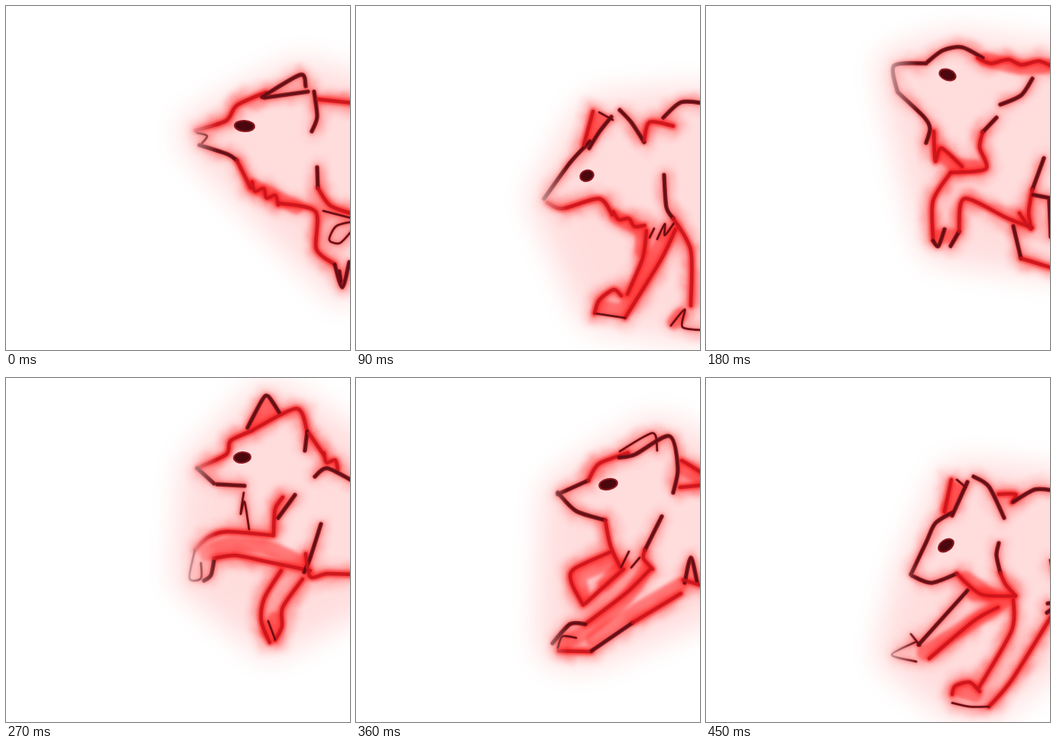
Write an HTML page that moves like this. It is 450 by 450 pixels and loops after 540 ms.

```html
<!DOCTYPE html>
<html lang="en">
<head>
<meta charset="utf-8">
<title>Running wolf</title>
<style>
html, body { margin: 0; height: 100%; overflow: hidden; background: #fff; }
svg { display: block; width: 100vw; height: 100vh; }
path { fill: none; stroke-linecap: round; stroke-linejoin: round; }
</style>
</head>
<body>
<svg id="stage" viewBox="0 0 450 450">
  <defs>
    <filter id="haze" filterUnits="userSpaceOnUse" x="-50" y="-50" width="640" height="560" color-interpolation-filters="sRGB">
      <feGaussianBlur stdDeviation="19"/>
    </filter>
    <filter id="glow" filterUnits="userSpaceOnUse" x="0" y="-50" width="520" height="560" color-interpolation-filters="sRGB">
      <feTurbulence type="fractalNoise" baseFrequency=".035" numOctaves="2" seed="4" result="noise"/>
      <feGaussianBlur in="SourceGraphic" stdDeviation="7.5" result="soft"/>
      <feDisplacementMap in="soft" in2="noise" scale="14" xChannelSelector="R" yChannelSelector="G"/>
    </filter>
    <filter id="smear" filterUnits="userSpaceOnUse" x="0" y="-50" width="520" height="560" color-interpolation-filters="sRGB">
      <feGaussianBlur stdDeviation="2.2"/>
    </filter>
    <linearGradient id="edge" gradientUnits="userSpaceOnUse" x1="234" y1="0" x2="276" y2="0">
      <stop stop-color="#fff" stop-opacity=".25"/>
      <stop offset="1" stop-color="#fff"/>
    </linearGradient>
    <mask id="fade" maskUnits="userSpaceOnUse" x="0" y="0" width="450" height="450">
      <rect width="450" height="450" fill="url(#edge)"/>
    </mask>
  </defs>
</svg>
<script>
const stage = document.getElementById('stage');

function add(parent, name, attrs) {
  const el = document.createElementNS('http://www.w3.org/2000/svg', name);
  for (const key in attrs) el.setAttribute(key, attrs[key]);
  return parent.appendChild(el);
}

const pairs = nums => nums.flatMap((x, i) => i % 2 ? [] : [[x, nums[i + 1]]]);

// Smooth curve through all points
function curve(pts) {
  const at = i => pts[Math.max(0, Math.min(pts.length - 1, i))];
  let d = 'M' + pts[0];
  for (let i = 0; i < pts.length - 1; i++) {
    const [a, b, c, e] = [at(i - 1), at(i), at(i + 1), at(i + 2)];
    const p = [0, 1].map(k => b[k] + (c[k] - a[k]) / 7);
    const q = [0, 1].map(k => c[k] - (e[k] - b[k]) / 7);
    d += `C${p} ${q} ${c}`;
  }
  return d;
}

function hull(pts) {
  const half = list => {
    const out = [];
    for (const p of list) {
      while (out.length > 1) {
        const [a, b] = out.slice(-2);
        if ((b[0] - a[0]) * (p[1] - a[1]) > (b[1] - a[1]) * (p[0] - a[0])) break;
        out.pop();
      }
      out.push(p);
    }
    return out;
  };
  const sorted = [...pts].sort((a, b) => a[0] - b[0] || a[1] - b[1]);
  return [...half(sorted), ...half(sorted.reverse())];
}

function build(pose) {
  const root = add(stage, 'g', { display: 'none' });
  const haze = add(root, 'g', { filter: 'url(#haze)', opacity: .13 });
  const front = add(root, 'g', { mask: 'url(#fade)' });
  const glow = add(front, 'g', { filter: 'url(#glow)', opacity: .6 });
  const smear = add(front, 'g', { filter: 'url(#smear)' });
  const lines = add(front, 'g', {});
  const all = [];
  const stroke = (layer, d, color, width, opacity = 1) =>
    add(layer, 'path', { d, stroke: color, 'stroke-width': width, 'stroke-opacity': opacity });

  const trace = (nums, halo, width, color, core) => {
    const pts = pairs(nums), d = curve(pts);
    all.push(...pts);
    stroke(glow, d, '#ff1616', halo);
    stroke(smear, d, '#fa1c1c', width + halo / 5, core ? .45 : .9);
    stroke(lines, d, color, width, .88);
    if (core) stroke(lines, d, core, width / 2, .7);
  };
  const red = (...n) => trace(n, 17, 4.5, '#c9141c');
  const ink = (...n) => trace(n, 9, 5.5, '#7d1018', '#4d0a10');
  const thin = (...n) => trace(n, 7, 3, '#7d1018', '#4d0a10');
  const wash = (...n) => stroke(smear, curve(pairs(n)), '#ff2525', 19, .5);
  const fur = (x, y, x2, y2, count, size) => {
    const nums = [];
    for (let i = 0; i <= count; i++) {
      const t = i / count, side = i % 2 ? size : -size;
      nums.push(x + (x2 - x) * t - side / 2, y + (y2 - y) * t + side);
    }
    red(...nums);
  };
  const eye = (x, y, tilt, rx = 11) => add(lines, 'ellipse', {
    rx, ry: 7, fill: '#4a080e', stroke: '#8f1820', 'stroke-width': 2,
    transform: `translate(${x} ${y}) rotate(${tilt})`
  });

  pose({ red, ink, thin, wash, fur, eye });
  const body = hull(all.map(([x, y]) => [x > 440 ? x + 70 : x, y]));
  add(haze, 'path', { d: `M${body.join('L')}Z`, stroke: '#f00', 'stroke-width': 42, style: 'fill:#f00' });
  return root;
}

function stretch({ red, ink, thin, wash, fur, eye }) {
  wash(322, 235, 380, 263);
  red(248, 163, 288, 150, 302, 130, 340, 113);
  ink(335, 119, 385, 90, 392, 105);
  ink(338, 120, 395, 112);
  ink(403, 112, 407, 145, 400, 164);
  red(408, 122, 454, 127);
  eye(312, 157, 4, 13);
  thin(250, 166, 263, 170, 256, 180);
  ink(253, 182, 290, 194, 302, 202);
  red(302, 202, 320, 238);
  fur(320, 234, 358, 256, 5, 4);
  red(358, 258, 405, 269, 406, 318, 430, 338);
  ink(407, 211, 408, 238);
  red(408, 238, 424, 261, 454, 272);
  ink(430, 338, 440, 368, 449, 335);
  ink(436, 347, 438, 360);
  thin(415, 268, 454, 278);
  thin(454, 282, 432, 288, 423, 306, 437, 310, 454, 292);
}

function land({ red, ink, thin, wash, fur, eye }) {
  wash(320, 148, 307, 172);
  wash(408, 300, 385, 335, 352, 394, 322, 394);
  wash(340, 276, 372, 294, 374, 320);
  wash(416, 414, 424, 404);
  ink(246, 252, 280, 205, 306, 177);
  red(298, 182, 310, 138);
  ink(305, 186, 318, 165, 334, 145);
  thin(318, 139, 336, 149);
  ink(345, 136, 360, 152, 377, 178);
  red(377, 176, 384, 152, 415, 157);
  ink(402, 146, 425, 126, 454, 127);
  eye(302, 222, -20, 9);
  red(250, 257, 270, 265, 318, 252, 335, 273);
  fur(335, 272, 376, 290, 4, 3);
  red(380, 294, 375, 330, 355, 377);
  red(418, 292, 400, 330, 365, 387, 352, 408);
  thin(352, 408, 312, 402);
  red(312, 402, 318, 385, 337, 371, 347, 379);
  ink(403, 221, 406, 263, 415, 278);
  thin(390, 291, 384, 303);
  thin(394, 305, 404, 285, 404, 300, 416, 284);
  red(415, 278, 438, 320, 438, 392);
  thin(412, 418, 430, 397, 427, 420, 454, 424);
}

function rise({ red, ink, thin, wash, fur, eye }) {
  wash(365, 70, 412, 80, 454, 78);
  wash(304, 190, 325, 207, 352, 211);
  wash(304, 302, 322, 300);
  ink(288, 75, 246, 78, 250, 111);
  ink(290, 73, 310, 58, 335, 54, 362, 68);
  fur(354, 71, 454, 76, 5, 3);
  ink(427, 95, 412, 117, 385, 129);
  eye(316, 90, 20);
  ink(251, 113, 285, 145, 293, 160, 288, 179);
  red(298, 164, 300, 203, 308, 186, 335, 210);
  ink(380, 146, 362, 165);
  red(362, 165, 358, 185, 366, 213, 320, 218);
  red(320, 218, 297, 255, 297, 306);
  ink(297, 307, 304, 314, 312, 292);
  ink(320, 314, 331, 295);
  red(331, 295, 338, 252, 395, 278, 427, 290);
  ink(442, 199, 427, 240);
  red(427, 240, 422, 270, 425, 292, 410, 271);
  ink(402, 288, 412, 330);
  red(412, 330, 454, 343);
  ink(428, 247, 454, 252);
  ink(449, 254, 451, 302);
}

function leap({ red, ink, thin, wash, fur, eye }) {
  wash(326, 58, 342, 38, 348, 46);
  wash(262, 230, 290, 218, 345, 223, 390, 244);
  wash(342, 332, 352, 315);
  red(250, 118, 288, 100, 294, 82, 322, 69);
  ink(316, 65, 335, 29, 343, 24, 358, 46);
  red(323, 68, 380, 40, 394, 70);
  ink(394, 70, 391, 95);
  red(396, 72, 416, 101);
  fur(414, 102, 436, 116, 3, 4);
  ink(404, 129, 420, 118, 454, 135);
  eye(309, 104, -5);
  ink(250, 118, 272, 138);
  ink(276, 139, 312, 141);
  thin(311, 150, 307, 178, 312, 162, 318, 198);
  ink(378, 153, 356, 183);
  red(362, 156, 352, 172, 350, 204);
  red(350, 206, 290, 201, 265, 208, 247, 225);
  thin(247, 225, 240, 262, 255, 262, 255, 242);
  ink(259, 265, 268, 258, 272, 239);
  red(272, 236, 300, 232, 340, 240, 398, 252);
  ink(412, 191, 398, 235, 390, 254);
  red(392, 230, 398, 260, 420, 256, 454, 257);
  red(360, 252, 338, 288, 334, 318, 345, 346);
  red(388, 263, 362, 300, 361, 325, 352, 343);
  thin(343, 318, 352, 342);
}

function reach({ red, ink, thin, wash, fur, eye }) {
  wash(428, 118, 450, 130);
  wash(380, 250, 355, 285, 300, 332, 270, 346);
  wash(425, 270, 365, 305, 310, 342);
  wash(335, 242, 295, 258, 296, 282);
  wash(325, 270, 350, 245);
  ink(264, 152, 304, 134);
  red(304, 134, 318, 112, 356, 98);
  thin(345, 96, 388, 72, 394, 95);
  ink(344, 104, 365, 100, 410, 76, 421, 118, 415, 150);
  red(426, 108, 438, 115, 454, 125);
  red(424, 143, 454, 140);
  eye(330, 139, -12, 12);
  ink(264, 150, 288, 174, 326, 186);
  red(326, 186, 333, 220, 346, 248);
  ink(400, 181, 378, 225);
  red(378, 225, 376, 236, 388, 250);
  thin(357, 227, 347, 247);
  thin(371, 235, 360, 248);
  red(332, 228, 285, 250, 282, 268, 297, 297);
  red(300, 295, 350, 250);
  red(385, 250, 355, 280, 300, 322);
  ink(300, 322, 280, 322, 257, 347);
  thin(264, 353, 270, 338, 288, 340);
  red(265, 357, 308, 358);
  ink(308, 357, 362, 320);
  red(362, 320, 425, 282);
  ink(430, 268, 438, 235, 446, 266);
  red(428, 264, 454, 272);
}

function gather({ red, ink, thin, wash, fur, eye }) {
  wash(327, 146, 315, 172);
  wash(350, 282, 390, 290, 335, 328, 285, 360);
  wash(335, 410, 352, 415);
  wash(340, 262, 370, 283);
  ink(268, 257, 288, 215, 300, 190, 322, 176);
  red(312, 175, 321, 133);
  ink(322, 180, 342, 136);
  thin(328, 133, 340, 143);
  ink(350, 129, 370, 142, 390, 183);
  red(383, 152, 405, 152, 400, 163);
  ink(402, 162, 430, 146, 454, 147);
  eye(314, 219, -35);
  ink(270, 259, 295, 268, 328, 256);
  red(328, 256, 360, 283, 405, 285);
  ink(383, 216, 380, 232, 385, 255);
  red(385, 255, 392, 270, 405, 285);
  ink(342, 278, 278, 349);
  red(382, 300, 350, 318, 292, 367);
  thin(280, 350, 268, 335);
  thin(275, 345, 243, 362, 275, 371);
  red(402, 290, 400, 330, 357, 405);
  red(454, 308, 400, 395, 370, 430);
  red(322, 414, 326, 403, 345, 398, 358, 410);
  thin(322, 425, 345, 430, 370, 430);
  ink(447, 295, 454, 294);
  ink(446, 307, 454, 301);
  thin(450, 238, 454, 260);
}

const views = [stretch, land, rise, leap, reach, gather].map(build);

function draw() {
  const now = Math.floor(performance.now() / 90) % views.length;
  views.forEach((view, i) => view.setAttribute('display', i === now ? 'inline' : 'none'));
  requestAnimationFrame(draw);
}
draw();
</script>
</body>
</html>
```
